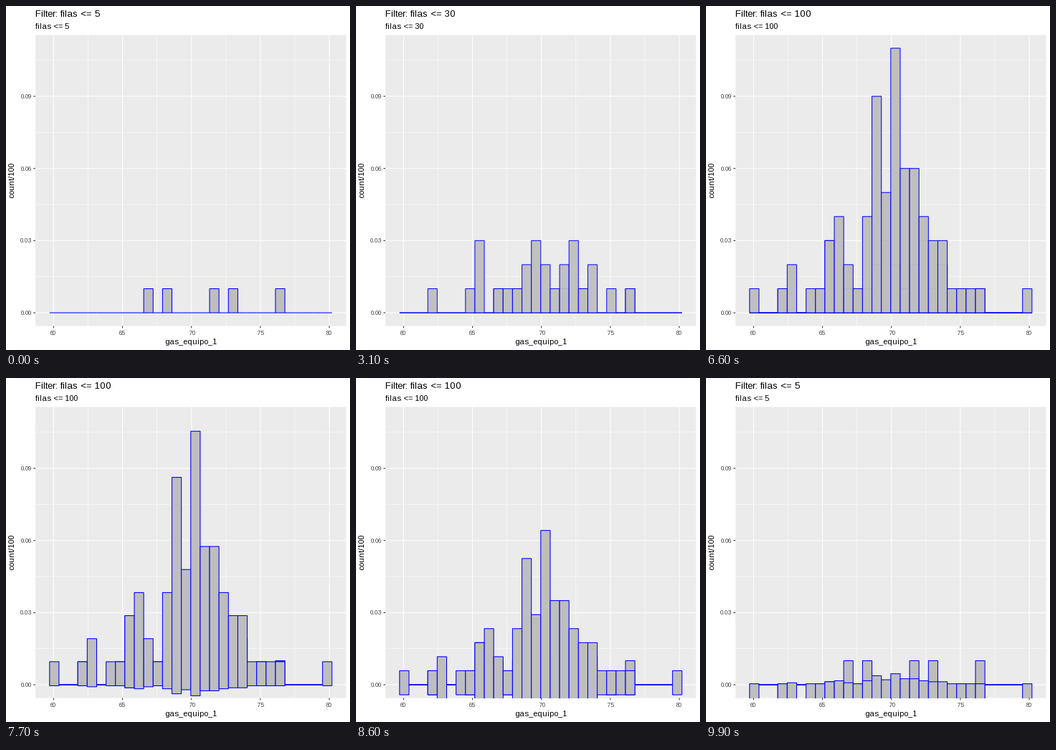
These frames come from a looping animation (480 by 480 pixels, 10 s). A matplotlib script:

```python
import matplotlib.pyplot as plt
from matplotlib.animation import FuncAnimation
from matplotlib.collections import PolyCollection

plt.rcParams.update({
    "font.family": "Liberation Sans",
    "text.hinting": "force_autohint",
    "text.hinting_factor": 1,
})

SIZE, DPI, FRAMES = 480, 96, 100
PT = 72 / DPI  # one pixel in points
LINE = 1.07 * PT

# Panel edges in pixels
LEFT, RIGHT, TOP, BOTTOM = 41.1, 474.52, 40.45, 446.5

# Histogram bins and the bar heights (in counts) of the three filters
FIRST, WIDTH, BINS = 59.71, 0.6828, 30
COUNTS = [
    {10: 1, 12: 1, 17: 1, 19: 1, 24: 1},
    {3: 1, 7: 1, 8: 3, 10: 1, 11: 1, 12: 1, 13: 2, 14: 3, 15: 2, 16: 1,
     17: 2, 18: 3, 19: 1, 20: 2, 22: 1, 24: 1},
    {0: 1, 3: 1, 4: 2, 6: 1, 7: 1, 8: 3, 9: 4, 10: 2, 11: 1, 12: 4, 13: 9,
     14: 5, 15: 11, 16: 6, 17: 6, 18: 4, 19: 3, 20: 3, 21: 1, 22: 1, 23: 1,
     24: 1, 29: 1},
]

# Frames where each transition starts and ends
FADE_2, FADE_3, DROP = (8, 33), (42, 67), (76, 100)

fig = plt.figure(figsize=(SIZE / DPI, SIZE / DPI), dpi=DPI, facecolor="white")
ax = fig.add_axes([LEFT / SIZE, 1 - BOTTOM / SIZE,
                   (RIGHT - LEFT) / SIZE, (BOTTOM - TOP) / SIZE])
span = WIDTH * BINS
ax.set_xlim(FIRST - 0.05 * span, FIRST + 1.05 * span)
ax.set_ylim(-0.0055, 0.1155)
ax.set_xticks([])
ax.set_yticks([])
ax.set_facecolor("#EBEBEB")
ax.patch.set_snap(False)
for spine in ax.spines.values():
    spine.set_visible(False)


def label(x, y, text, size, **kw):
    """Place text by its baseline, in pixels from the top left."""
    kw.setdefault("va", "baseline")
    return fig.text(x / SIZE, 1 - y / SIZE, text, fontsize=size * PT, **kw)


def tick(xs, ys):
    fig.add_artist(plt.Line2D([x / SIZE for x in xs], [1 - y / SIZE for y in ys],
                              color="#333333", lw=LINE, snap=False,
                              solid_capstyle="butt"))


def to_pixels(x, y):
    px, py = ax.transData.transform((x, y))
    return px, SIZE - py


def grid(xs, ys, width):
    style = dict(color="white", lw=width, snap=False, zorder=1)
    for x in xs:
        ax.axvline(x, **style)
    for y in ys:
        ax.axhline(y, **style)


x_major, y_major = [60, 65, 70, 75, 80], [0, 0.03, 0.06, 0.09]
grid([62.5, 67.5, 72.5, 77.5], [0.015, 0.045, 0.075, 0.105], LINE / 2)
grid(x_major, y_major, LINE)

for x in x_major:
    px = to_pixels(x, 0)[0]
    tick([px, px], [BOTTOM, BOTTOM + 2.74])
    label(px, 459, str(x), 8.8, ha="center", color="#4D4D4D")
for y in y_major:
    py = to_pixels(60, y)[1]
    tick([LEFT - 2.74, LEFT], [py, py])
    label(36.2, py + 3, f"{y:.2f}", 8.8, ha="right", color="#4D4D4D")

label(257.8, 472, "gas_equipo_1", 11, ha="center")
label(13, 243.5, "count/100", 11, rotation=90, ha="right", va="center")
title = label(41, 15, "", 13.2)
subtitle = label(41, 32, "", 11)


def bars(counts, drop=0):
    """Outlines of all bars, each lowered by a share of its own height."""
    verts = []
    for i in range(BINS):
        x0, h = FIRST + i * WIDTH, counts.get(i, 0) / 100
        x1, y0, y1 = x0 + WIDTH, -drop * h, (1 - drop) * h
        verts.append([(x0, y1), (x1, y1), (x1, y0), (x0, y0)])
    return verts


layers = []
for z, counts in enumerate(COUNTS):
    layer = PolyCollection(bars(counts), facecolor="#BEBEBE", edgecolor="blue",
                           lw=LINE, joinstyle="miter", snap=False, zorder=3 + z)
    ax.add_collection(layer, autolim=False)
    layers.append(layer)


def progress(n, interval):
    start, end = interval
    return min(max((n - start) / (end - start), 0), 1)


def update(n):
    drop = progress(n, DROP)
    for layer, counts, fade in zip(layers[1:], COUNTS[1:], (FADE_2, FADE_3)):
        alpha = progress(n, fade)
        layer.set_visible(alpha > 0)
        layer.set_alpha(alpha)
        layer.set_verts(bars(counts, drop))
    rows = 30 if 21 <= n < 55 else 100 if 55 <= n < 88 else 5
    title.set_text(f"Filter: filas <= {rows}")
    subtitle.set_text(f"filas <= {rows}")
    return layers + [title, subtitle]


anim = FuncAnimation(fig, update, frames=FRAMES, interval=100,
                     repeat=True, repeat_delay=0, blit=False)
plt.show()
```
